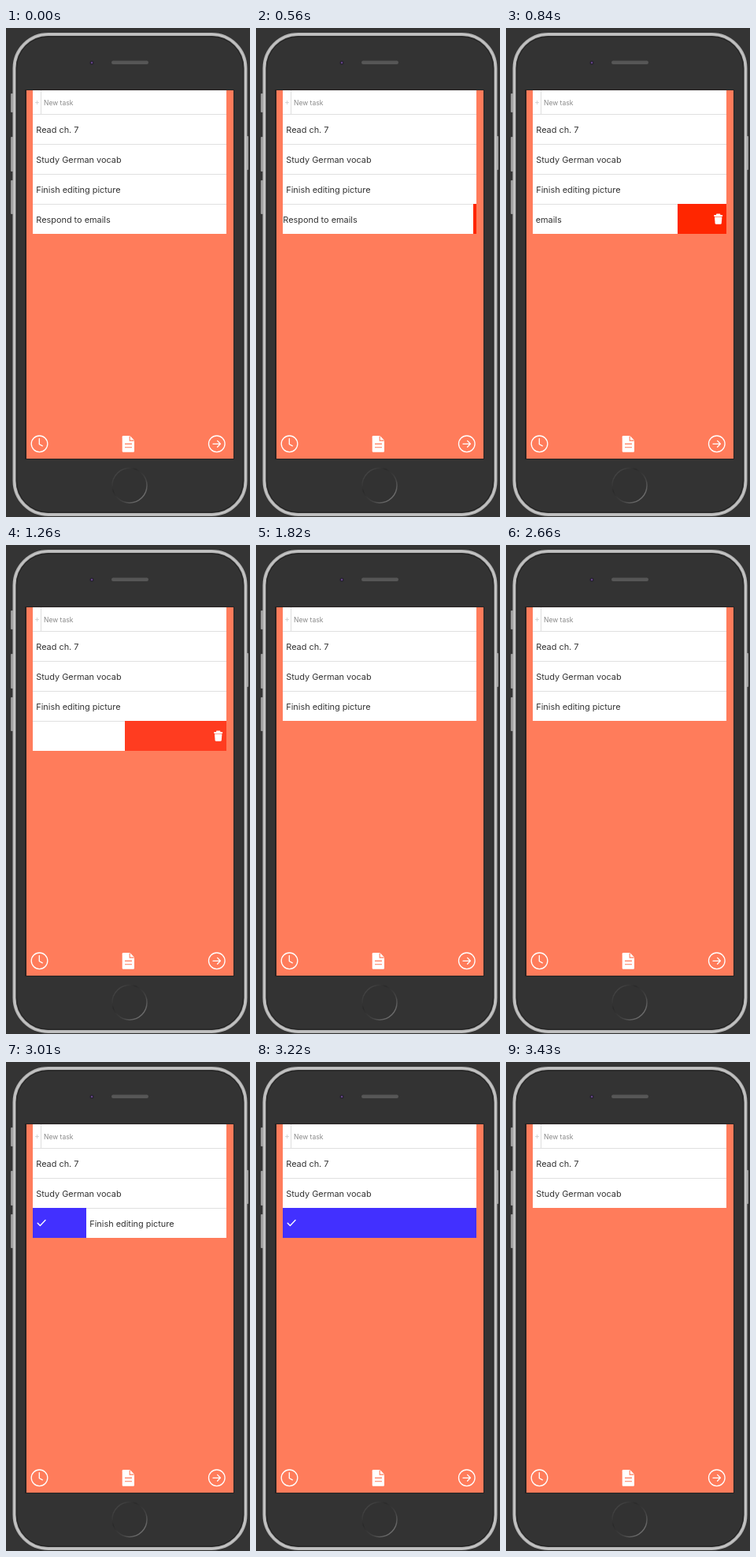
An HTML page that plays this animation: 310 px wide and 620 px high, repeating every 3.64 s.

```html
<!DOCTYPE html>
<html lang="en">
<head>
<meta charset="utf-8">
<title>Swipe to-do list</title>
<style>
  html, body { margin: 0; width: 100%; height: 100%; overflow: hidden; background: #343434; }
  #stage { display: block; width: 310px; height: 620px; }
  text { font-family: Inter, "Open Sans", sans-serif; font-size: 10.9px; fill: #333; }
  .hint { font-size: 8.5px; fill: #888; }
  .line { fill: none; stroke: #fff; stroke-width: 1.3; stroke-linecap: round; stroke-linejoin: round; }
</style>
</head>
<body>
<svg id="stage" viewBox="0 0 310 620">
  <defs>
    <linearGradient id="ring" x1="0" y1="0" x2="1" y2="1">
      <stop offset="0" stop-color="#555"/>
      <stop offset=".35" stop-color="#2a2a2a"/>
      <stop offset=".65" stop-color="#444"/>
      <stop offset="1" stop-color="#8a8a8a"/>
    </linearGradient>
  </defs>

  <!-- phone -->
  <rect width="310" height="620" fill="#343434"/>
  <g fill="#9a9a9a">
    <rect x="6" y="83" width="3" height="24" rx="1"/>
    <rect x="6" y="138" width="3" height="44" rx="1"/>
    <rect x="6" y="193" width="3" height="43" rx="1"/>
    <rect x="305" y="137" width="3" height="43" rx="1"/>
  </g>
  <rect x="10.5" y="8" width="294" height="609" rx="43" fill="#333" stroke="#b4b4b4" stroke-width="4"/>
  <rect x="10.5" y="8" width="294" height="609" rx="43" fill="none" stroke="#cfcfcf"/>
  <rect x="13.5" y="11" width="288" height="603" rx="40" fill="none" stroke="#222"/>
  <rect x="134" y="41.5" width="47" height="4.5" rx="2.2" fill="#565656"/>
  <circle cx="109" cy="44" r="2.6" fill="#262230"/>
  <circle cx="109" cy="44" r="1.2" fill="#67458a"/>
  <circle cx="157" cy="580" r="22" fill="#323232" stroke="url(#ring)" stroke-width="1.4"/>

  <!-- screen -->
  <rect x="24" y="78" width="266" height="469" fill="#272222"/>
  <rect x="26" y="79" width="263" height="467" fill="#ff7c5b"/>
  <rect x="34" y="79" width="246" height="30" fill="#fff"/>
  <path d="M44.5 79V109" stroke="#dedede"/>
  <path d="M37 94.5h5M39.5 92v5" stroke="#c8c8c8" stroke-width=".7"/>
  <text class="hint" x="48" y="97.7">New task</text>
  <g id="rows"></g>

  <!-- toolbar -->
  <circle class="line" cx="42.5" cy="527.3" r="10.3"/>
  <path class="line" d="M42.3 520.7v7l4 2.2"/>
  <path d="M149 517h8.5l5.5 5.8V536.5q0 1.3-1.3 1.3H149q-1.3 0-1.3-1.3V518.3q0-1.3 1.3-1.3z" fill="#fff"/>
  <path d="M157.2 517.5v5.6h5.4M151 527.4h9M151 531.8h9" fill="none" stroke="#ff7c5b" stroke-width="1.1"/>
  <circle class="line" cx="267.8" cy="527.3" r="10.3"/>
  <path class="line" d="M263 527.3h9.3M268.6 523.4l3.8 3.9-3.8 3.9"/>
</svg>

<script>
const LOOP = 3640, STEP = 70, WIDTH = 246, ROW = 38, TOP = 109;
const NS = "http://www.w3.org/2000/svg";
const titles = ["Read ch. 7", "Study German vocab", "Finish editing picture", "Respond to emails"];

const trash = `<g fill="#fff">
  <rect x="230.2" y="14" width="11" height="2" rx=".7"/>
  <rect x="233" y="12.6" width="5.4" height="2" rx=".8"/>
  <path d="M231 16.6h9.4l-.6 7.9q-.1 1.3-1.4 1.3h-5.4q-1.3 0-1.4-1.3z"/></g>`;
const check = `<path class="line" d="M6.2 19.2l3.2 3.3 6.6-7"/>`;

// slide and height are lists of [time, value]
const swipes = [
  { row: 3, dir: -1, icon: trash, from: [255, 38, 0], to: [255, 60, 32],
    slide: [[490, 0], [560, 4], [700, 32], [840, 62], [1050, 96], [1260, 129], [1400, WIDTH]],
    height: [[1540, ROW], [1820, 0]] },
  { row: 2, dir: 1, icon: check, from: [66, 48, 255], to: [66, 48, 255],
    slide: [[2660, 0], [2800, 22], [3010, 68], [3220, WIDTH]],
    height: [[3220, ROW], [3430, 0]] }
];

function track(points, t) {
  if (t <= points[0][0]) return points[0][1];
  for (let i = 1; i < points.length; i++) {
    const [t0, a] = points[i - 1], [t1, b] = points[i];
    if (t <= t1) return a + (b - a) * (t - t0) / (t1 - t0);
  }
  return points[points.length - 1][1];
}

function mix(a, b, k) {
  return `rgb(${a.map((v, i) => Math.round(v + (b[i] - v) * k))})`;
}

const rows = titles.map((title, i) => {
  const box = document.createElementNS(NS, "svg");
  const set = { x: 34, y: TOP + ROW * i, width: WIDTH, height: ROW, overflow: "hidden" };
  for (const key in set) box.setAttribute(key, set[key]);
  const swipe = swipes.find(s => s.row === i);
  box.innerHTML = `<rect class="back" width="${WIDTH}" height="${ROW}" fill="#fff"/>
    ${swipe ? swipe.icon : ""}
    <g class="face"><rect width="${WIDTH}" height="${ROW}" fill="#fff"/>
    <path d="M0 .5H${WIDTH}" stroke="#e0e0e0"/>
    <text x="4.3" y="23.6">${title}</text></g>`;
  document.getElementById("rows").append(box);
  return { box, back: box.querySelector(".back"), face: box.querySelector(".face") };
});

function draw(t) {
  for (const s of swipes) {
    const { box, back, face } = rows[s.row];
    const shift = track(s.slide, t), height = track(s.height, t);
    face.setAttribute("transform", `translate(${s.dir * shift} 0)`);
    back.setAttribute("fill", mix(s.from, s.to, Math.min(1, Math.max(0, (shift - 62) / 67))));
    box.setAttribute("height", height);
    box.setAttribute("visibility", height > 0 ? "visible" : "hidden");
  }
}

const start = performance.now();
function frame() {
  const t = (performance.now() - start) % LOOP;
  draw(Math.floor(t / STEP) * STEP);
  requestAnimationFrame(frame);
}
frame();
</script>
</body>
</html>
```
